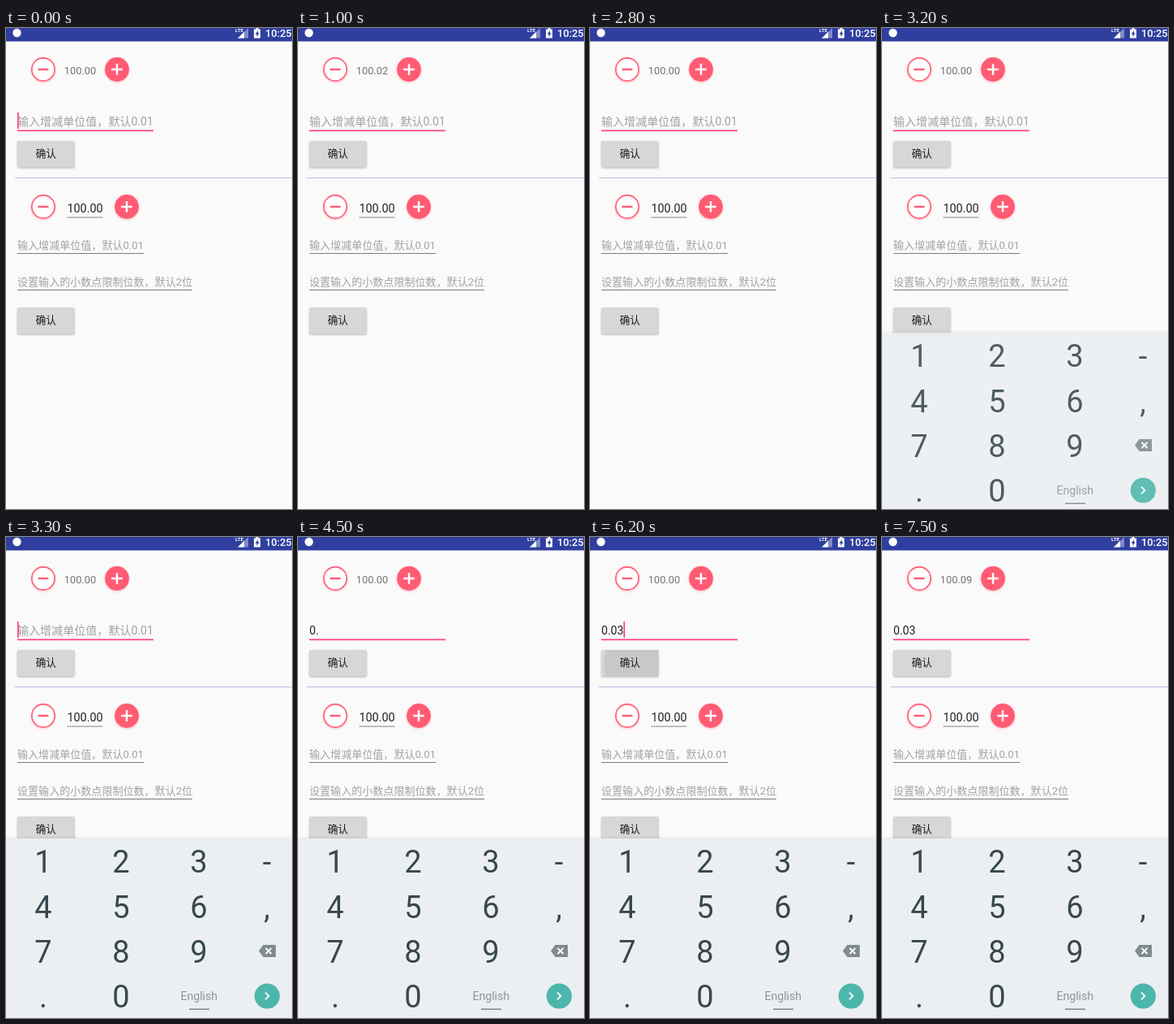
An HTML page that plays this animation: 353 by 592 pixels, repeating every 8 s.

```html
<!DOCTYPE html>
<html lang="zh-CN">
<head>
<meta charset="utf-8">
<style>
  html, body { margin: 0; width: 100%; height: 100%; overflow: hidden; background: #fafafa; }
  svg { display: block; width: 353px; height: 592px; font-family: Roboto, "Noto Sans CJK SC", "Noto Sans CJK", sans-serif; }
  text { white-space: pre; }
  .hint { fill: #a2a2a2; }
  .ink { fill: #222; }
  .raised { filter: drop-shadow(0 1px 1px rgba(0, 0, 0, .28)); }
  .round { filter: drop-shadow(0 1.5px 1.5px rgba(255, 80, 105, .38)); }
  .key { font-size: 38px; fill: #37474f; text-anchor: middle; }
</style>
</head>
<body>
<svg id="stage" viewBox="0 0 353 592"></svg>
<script>
const LOOP = 8000;
const PINK = '#ff5c74';

// [start ms, value...]; each row holds until the next one
const counterSteps = [
  [0, '100.00'], [900, '100.01'], [1000, '100.02'], [1800, '100.01'], [2200, '100.00'],
  [7000, '100.03'], [7200, '100.06'], [7400, '100.09']
];
const typingSteps = [[0, ''], [3900, '0'], [4100, '0.'], [5100, '0.0'], [5200, '0.03']];
const caretSteps = [
  [0, 1], [100, 0], [500, 1], [1000, 0], [1500, 1], [1900, 0], [2400, 1], [2800, 0],
  [3300, 1], [3800, 0], [3900, 1], [4500, 0], [5000, 1], [5700, 0], [6200, 1],
  [6600, 0], [7100, 1], [7500, 0]
];
// keyboard: offset, opacity
const keyboardSteps = [[0, 0, 0], [3200, 4, 0.88], [3300, 0, 1]];
// ripple: radius, opacity
const rippleSteps = [[0, 0, 0], [6100, 22, 0.05], [6200, 37, 0.07], [6500, 58, 0.03], [6600, 0, 0]];

const at = (steps, t) => steps.findLast(step => step[0] <= t).slice(1);

const text = (x, y, size, content, attrs = '') =>
  `<text x="${x}" y="${y}" font-size="${size}" ${attrs}>${content}</text>`;
const rect = (x, y, w, h, fill, attrs = '') =>
  `<rect x="${x}" y="${y}" width="${w}" height="${h}" fill="${fill}" ${attrs}/>`;
const path = (d, attrs) => `<path d="${d}" ${attrs}/>`;

const minus = (x, y) =>
  `<circle class="round" cx="${x}" cy="${y}" r="14.1" fill="#fff" stroke="${PINK}" stroke-width="1.6"/>` +
  rect(x - 6.5, y - 1.2, 13, 2.4, PINK);

const plus = (x, y) =>
  `<circle class="round" cx="${x}" cy="${y}" r="14.9" fill="${PINK}"/>` +
  path(`M${x - 6.8} ${y}h13.6M${x} ${y - 6.8}v13.6`, 'stroke="#fff" stroke-width="2.5"');

const button = (y, inner = '') =>
  rect(14, y, 70.5, 32.5, '#d6d7d7', 'rx="1.5" class="raised"') + inner +
  text(49.3, y + 20.4, 12.6, '确认', 'text-anchor="middle" fill="#1c1c1c"');

const statusBar = () =>
  rect(0, 0, 353, 16.5, '#303f9f') +
  '<circle cx="13.5" cy="6" r="5.2" fill="#fff"/>' +
  text(283, 5, 6.2, 'LTE', 'fill="#fff" font-weight="700"') +
  path('M286 12.5L299 0V12.5Z', 'fill="#fff" opacity=".4"') +
  path('M286 12.5L294 4.8V12.5Z', 'fill="#fff"') +
  path('M306 1.5h2.5V0h3v1.5h2.5v11h-8Z', 'fill="#fff"') +
  path('M311 3l-3.3 4.7h1.9v3.3l3-4.7h-1.6Z', 'fill="#303f9f"') +
  text(320, 11, 12.8, '10:25', 'fill="#fff" font-weight="500"');

const keyboard = () => {
  const columns = [46, 142, 238, 322];
  const rows = ['123-', '456,', '789', '.0'];
  const keys = rows.flatMap((row, r) => [...row].map((key, c) =>
    `<text class="key" x="${columns[c]}" y="${413.3 + r * 55.2}">${key}</text>`));
  return rect(0, 371, 353, 225, '#eceff1', 'style="filter:drop-shadow(0 -1px 1px rgba(0,0,0,.09))"') +
    keys.join('') +
    path('M312 509.5L317.5 502H333V517H317.5Z', 'fill="#7f8b91"') +
    path('M320.5 506l7 7m0-7l-7 7', 'stroke="#fff" stroke-width="1.8"') +
    text(238.3, 570, 14.1, 'English', 'text-anchor="middle" fill="#8b969c"') +
    rect(226, 580.5, 25, 1.3, '#68777f') +
    '<circle cx="322.3" cy="565" r="15.6" fill="#4db6ac"/>' +
    path('M320 560.6l4.4 4.4l-4.4 4.4', 'fill="none" stroke="#fff" stroke-width="1.8"');
};

document.getElementById('stage').innerHTML =
  '<clipPath id="buttonClip"><rect x="14" y="139" width="70.5" height="32.5" rx="1.5"/></clipPath>' +
  rect(0, 0, 353, 592, '#fafafa') + statusBar() +
  minus(46, 51) + plus(137, 51) +
  text(71.8, 57, 12.8, '', 'id="counter" fill="#747474"') +
  text(14, 120, 14.05, '输入增减单位值，默认0.01', 'id="hint" class="hint"') +
  text(14, 120, 14.05, '', 'id="typed" class="ink"') +
  rect(14, 125.5, 168, 1.7, '#ff4081') +
  rect(14, 104, 1.7, 20, '#ff4081', 'id="caret"') +
  button(139, '<g clip-path="url(#buttonClip)"><circle id="ripple" cx="54" cy="155"/></g>') +
  rect(11, 184, 342, 1, '#bbbde0') +
  minus(46, 220) + plus(149, 220) +
  text(75.4, 227, 14.4, '100.00', 'class="ink"') +
  rect(75.5, 232.6, 44, 1, '#858585') +
  text(14, 272, 13.05, '输入增减单位值，默认0.01', 'class="hint"') +
  rect(14, 277, 156, 1, '#7c7c7c') +
  text(14, 317, 13.05, '设置输入的小数点限制位数，默认2位', 'class="hint"') +
  rect(14, 322, 216, 1, '#7c7c7c') +
  button(344) +
  `<g id="keyboard">${keyboard()}</g>`;

const [counter, hint, typed, caret, ripple, keys] =
  ['counter', 'hint', 'typed', 'caret', 'ripple', 'keyboard'].map(id => document.getElementById(id));

function draw() {
  const t = performance.now() % LOOP;
  const [entry] = at(typingSteps, t);
  const [radius, shade] = at(rippleSteps, t);
  const [offset, opacity] = at(keyboardSteps, t);

  counter.textContent = at(counterSteps, t)[0];
  typed.textContent = entry;
  hint.setAttribute('opacity', entry ? 0 : 1);
  caret.setAttribute('x', 14 + (entry ? typed.getComputedTextLength() : 0));
  caret.setAttribute('opacity', at(caretSteps, t)[0]);
  ripple.setAttribute('r', radius);
  ripple.setAttribute('opacity', shade);
  keys.setAttribute('transform', `translate(0 ${offset})`);
  keys.setAttribute('opacity', opacity);
  requestAnimationFrame(draw);
}
draw();
</script>
</body>
</html>
```
